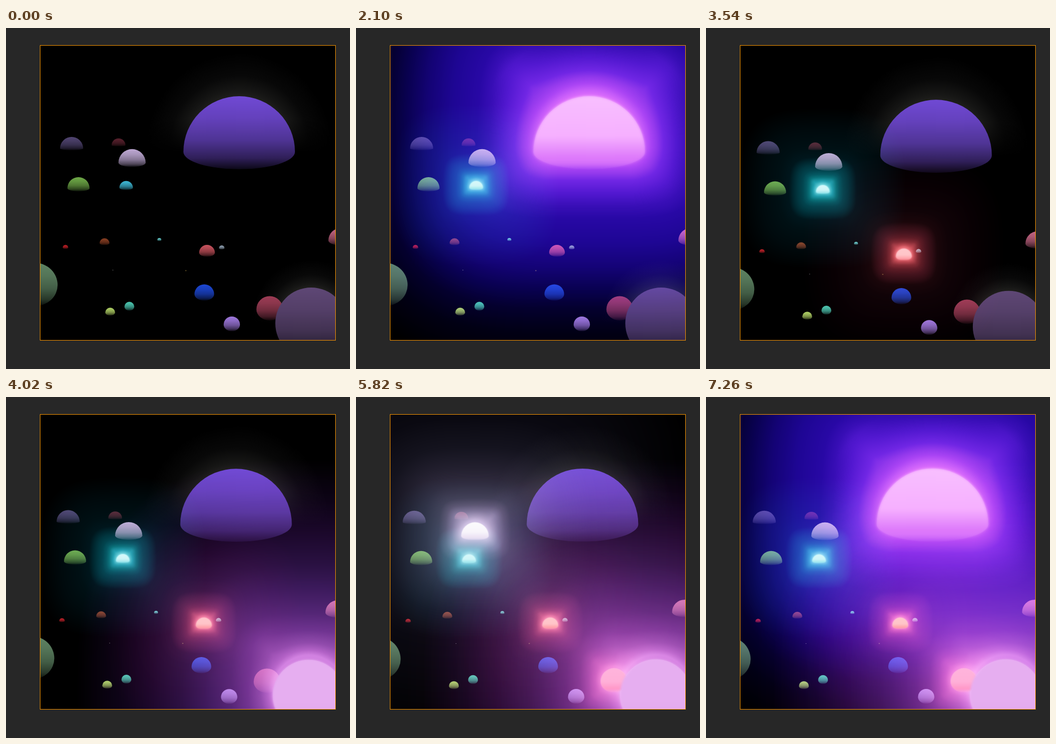
An HTML page with a canvas that plays this animation: 700x695 px, repeating every 8.28 s.

```html
<!DOCTYPE html>
<html lang="en">
<head>
<meta charset="utf-8">
<title>Glowing planets</title>
<style>
  html, body { margin: 0; width: 100%; height: 100%; overflow: hidden; background: #272727; }
  canvas { display: block; }
</style>
</head>
<body>
<canvas id="stage" width="700" height="695"></canvas>
<script>
const ctx = document.getElementById('stage').getContext('2d');
const LOOP = 8280;
const BOX = { x: 70, y: 36, size: 600 };
const CELL = 2; // stage pixels per glow sample

// x, y, radius, depth of the lower edge (share of radius), colour, name
const planets = [
  [133.5, 245.5, 23.5, .15, '#4a3f68'],
  [229, 239, 14, .15, '#521e2a'],
  [474.5, 252.5, 113.5, .31, '#6844c4', 'violet'],
  [244.5, 325.5, 13.7, .33, '#38aac4', 'cyan'],
  [256.5, 274.5, 27.7, .3, '#b09cc4', 'lavender'],
  [147.5, 326.5, 22.5, .28, '#669c42'],
  [121, 447.5, 5.5, .5, '#b01c22'],
  [200.5, 438.5, 10, .4, '#7e391f'],
  [312, 432, 4, .5, '#5cbcbc'],
  [439, 448.5, 5.5, .5, '#8494a4'],
  [409, 458, 16, .5, '#b84c56', 'red'],
  [217.5, 493.5, .7, 1, '#b0b0b0'],
  [366, 495, 1.4, .6, '#6a5828'],
  [403.5, 542.5, 20, .65, '#1a42c4'],
  [212, 580, 10, .6, '#a4c25e'],
  [251, 568, 10, .8, '#46b8a4'],
  [459.5, 604.5, 16.6, .8, '#926ecc'],
  [536.5, 573.5, 27, .83, '#91384f', 'pink'],
  [621, 602, 73, 1, '#57426c', 'purple'],
  [60, 524, 45, .94, '#577a5c'],
  [681, 433, 25, .4, '#b45c78']
].map(([x, y, r, depth, color, name]) => ({ x, y, r, depth, color, name }));

// core: fill from top to bottom, boxy: exponent of the far glow,
// ramp: glow colour at a distance from the outline
const lights = {
  violet: {
    core: ['#f8bfff', '#f6b0ff', '#dc78fa'], boxy: 2.8,
    ramp: [[-14, '#e070fc'], [0, '#c45af9'], [12, '#aa44f4'], [24, '#9238ec'], [38, '#7026e4'],
      [64, '#5218d0'], [90, '#380eb6'], [115, '#2808a5'], [165, '#1e0694'], [215, '#140376'],
      [260, '#090150'], [300, '#04002d'], [350, '#010014'], [420, '#000000']]
  },
  cyan: {
    core: ['#d8f8fa', '#d0f6f8', '#a4e8ee'], boxy: 3.5,
    ramp: [[0, '#64cdd7'], [6, '#20a0af'], [14, '#087078'], [20, '#045862'], [28, '#02444e'],
      [38, '#01363f'], [46, '#002830'], [55, '#00161c'], [75, '#001014'], [110, '#000a0d'],
      [155, '#000000']]
  },
  red: {
    core: ['#ffc8cc', '#ffc4c8', '#ffa0a8'], boxy: 3.2,
    ramp: [[0, '#eb6e78'], [5, '#be4852'], [12, '#822a34'], [20, '#5f1c26'], [30, '#46141e'],
      [42, '#300d14'], [52, '#1a060a'], [75, '#100307'], [130, '#080003'], [190, '#000000']]
  },
  purple: {
    core: ['#e6aef0', '#e6aef0', '#e4a8ee'], boxy: 2.4,
    ramp: [[0, '#d282e1'], [10, '#b464c8'], [25, '#914bac'], [50, '#703491'], [85, '#542676'],
      [135, '#3c1a5c'], [185, '#2a1142'], [245, '#1c082c'], [315, '#0d0316'], [400, '#000000']]
  },
  pink: {
    core: ['#ffb4dc', '#ffb0d8', '#ff98c8'], boxy: 2.8,
    ramp: [[0, '#e15a96'], [10, '#aa3a70'], [25, '#70224b'], [42, '#461430'], [70, '#2a091c'],
      [120, '#1a0511'], [220, '#0e0208'], [320, '#050003'], [400, '#000000']]
  },
  lavender: {
    core: ['#fcfbfd', '#f8f5fb', '#ece2f4'], boxy: 3.2,
    ramp: [[0, '#cdb9de'], [8, '#ac98be'], [20, '#7d6c90'], [32, '#5c4e6a'], [46, '#423a50'],
      [75, '#302b3e'], [110, '#221f2e'], [150, '#14131e'], [210, '#0a0911'], [420, '#000000']]
  }
};

// start, lit planets, camera turn, camera lift
const scenes = [
  [0, '', 0, 0],
  [780, 'violet', 0, 0],
  [2100, 'violet cyan', 0, 0],
  [2640, 'cyan', 0, 0],
  [3540, 'cyan red', .47, 1],
  [4020, 'cyan red purple', .47, 1],
  [4680, 'cyan red purple', 0, 1],
  [4740, 'cyan red purple pink', 0, 1],
  [5820, 'cyan red purple pink lavender', 1, 1],
  [6300, 'cyan red purple pink', 1, 1],
  [7260, 'cyan red purple pink violet', 1, 1]
];

const rgb = hex => [1, 3, 5].map(i => parseInt(hex.slice(i, i + 2), 16));
const shade = (hex, k) => `rgb(${rgb(hex).map(v => Math.min(255, v * k)).join(',')})`;
const fade = hex => `rgba(${rgb(hex).join(',')},0)`;
const norm = (a, b, p) => (a ** p + b ** p) ** (1 / p);

for (const light of Object.values(lights)) {
  light.ramp = light.ramp.map(([d, hex]) => [d, rgb(hex)]);
}

function place(body, turn, lift) {
  const { x, y } = body;
  const dx = -turn * (15 - .004 * (x - 120) - .014 * Math.max(0, y - 450));
  const dy = lift * 7.5 + turn * (2.5 - .0085 * (x - 110));
  return { ...body, x: x + dx, y: y + dy };
}

function rampAt(ramp, d) {
  if (d <= ramp[0][0]) return ramp[0][1];
  for (let i = 1; i < ramp.length; i++) {
    const [end, to] = ramp[i];
    if (d < end) {
      const [start, from] = ramp[i - 1];
      const k = (d - start) / (end - start);
      return from.map((v, c) => v + (to[c] - v) * k);
    }
  }
  return [0, 0, 0];
}

// follows the dome close to it and its bounding box further out
function glowDistance({ r, depth }, dx, dy, boxy) {
  const low = r * depth;
  const near = dy < 0
    ? Math.hypot(dx, dy) - r
    : Math.hypot(Math.max(dx - r + low, 0), dy) - low;
  if (near <= 0) return near;
  const half = (r + low) / 2;
  const offY = Math.abs(dy + (r - low) / 2) - half;
  const far = norm(Math.max(dx - r, 0), Math.max(offY, 0), boxy);
  return near + (far - near) * Math.min(1, near / r) * .8;
}

const glowCache = new Map();

function glowLayer(body) {
  const key = body.name + body.x + ',' + body.y;
  if (glowCache.has(key)) return glowCache.get(key);
  const { boxy, ramp } = lights[body.name];
  const n = BOX.size / CELL;
  const layer = document.createElement('canvas');
  layer.width = layer.height = n;
  const g = layer.getContext('2d');
  const img = g.createImageData(n, n);
  const top = body.y - body.r * .13; // the upper side shines more
  for (let j = 0, o = 0; j < n; j++) {
    const dy = BOX.y + (j + .5) * CELL - top;
    for (let i = 0; i < n; i++, o += 4) {
      const dx = Math.abs(BOX.x + (i + .5) * CELL - body.x);
      const c = rampAt(ramp, glowDistance(body, dx, dy, boxy));
      img.data[o] = c[0];
      img.data[o + 1] = c[1];
      img.data[o + 2] = c[2];
      img.data[o + 3] = 255;
    }
  }
  g.putImageData(img, 0, 0);
  glowCache.set(key, layer);
  return layer;
}

function fillDome({ x, y, r, depth }, stops) {
  const paint = ctx.createLinearGradient(0, y - r, 0, y + r * depth);
  for (const [at, color] of stops) paint.addColorStop(at, color);
  ctx.fillStyle = paint;
  ctx.beginPath();
  ctx.arc(x, y, r, Math.PI, 0);
  ctx.ellipse(x, y, r, r * depth, 0, 0, Math.PI);
  ctx.fill();
}

function drawHalo({ x, y, r }) {
  const cy = y - r * .12;
  const paint = ctx.createRadialGradient(x, cy, r * .85, x, cy, r * 1.65);
  paint.addColorStop(0, 'rgb(32,32,29)');
  paint.addColorStop(.2, 'rgb(21,21,20)');
  paint.addColorStop(.5, 'rgb(8,8,8)');
  paint.addColorStop(1, 'rgb(0,0,0)');
  ctx.fillStyle = paint;
  ctx.fillRect(x - r * 2, y - r * 2, r * 4, r * 2);
  // the halo dies out towards the widest line
  const under = ctx.createLinearGradient(0, y - r * .6, 0, y);
  under.addColorStop(0, 'rgba(0,0,0,0)');
  under.addColorStop(1, '#000');
  ctx.fillStyle = under;
  ctx.fillRect(x - r * 2, y - r * .6, r * 4, r * .6 + 1);
}

function drawPlanet(body) {
  const c = body.color;
  fillDome(body, [
    [0, shade(c, 1.08)], [.3, shade(c, .96)], [.6, shade(c, .76)],
    [.85, shade(c, .45)], [1, shade(c, .12)]
  ]);
}

function drawCore(body) {
  const [top, mid, low] = lights[body.name].core;
  ctx.filter = `blur(${.6 + body.r * .02}px)`;
  fillDome(body, [[0, top], [.55, mid], [.85, low], [1, fade(low)]]);
  ctx.filter = 'none';
}

function drawFrame() {
  const { x, y, size } = BOX;
  ctx.fillStyle = '#272727';
  ctx.fillRect(0, 0, 700, 695);
  ctx.fillStyle = '#ff9800';
  ctx.fillRect(x - 1, y - 1, size + 2, size + 2);
  ctx.fillStyle = '#000';
  ctx.fillRect(x, y, size, size);
}

function drawScene([, names, turn, lift]) {
  const { x, y, size } = BOX;
  const bodies = planets.map(b => place(b, turn, lift));
  const on = names.split(' ');
  const lit = bodies.filter(b => b.name && on.includes(b.name));
  drawFrame();
  ctx.save();
  ctx.beginPath();
  ctx.rect(x, y, size, size);
  ctx.clip();
  bodies.filter(b => b.r > 70 && !lit.includes(b)).forEach(drawHalo);
  bodies.forEach(drawPlanet);
  ctx.globalCompositeOperation = 'screen';
  ctx.imageSmoothingQuality = 'high';
  for (const b of lit) ctx.drawImage(glowLayer(b), x, y, size, size);
  ctx.globalCompositeOperation = 'source-over';
  lit.forEach(drawCore);
  ctx.restore();
}

const origin = performance.now();
let shown = -1;

function tick() {
  const t = (performance.now() - origin) % LOOP;
  const index = scenes.findLastIndex(s => s[0] <= t);
  if (index !== shown) {
    shown = index;
    drawScene(scenes[index]);
  }
  requestAnimationFrame(tick);
}
tick();
</script>
</body>
</html>
```
